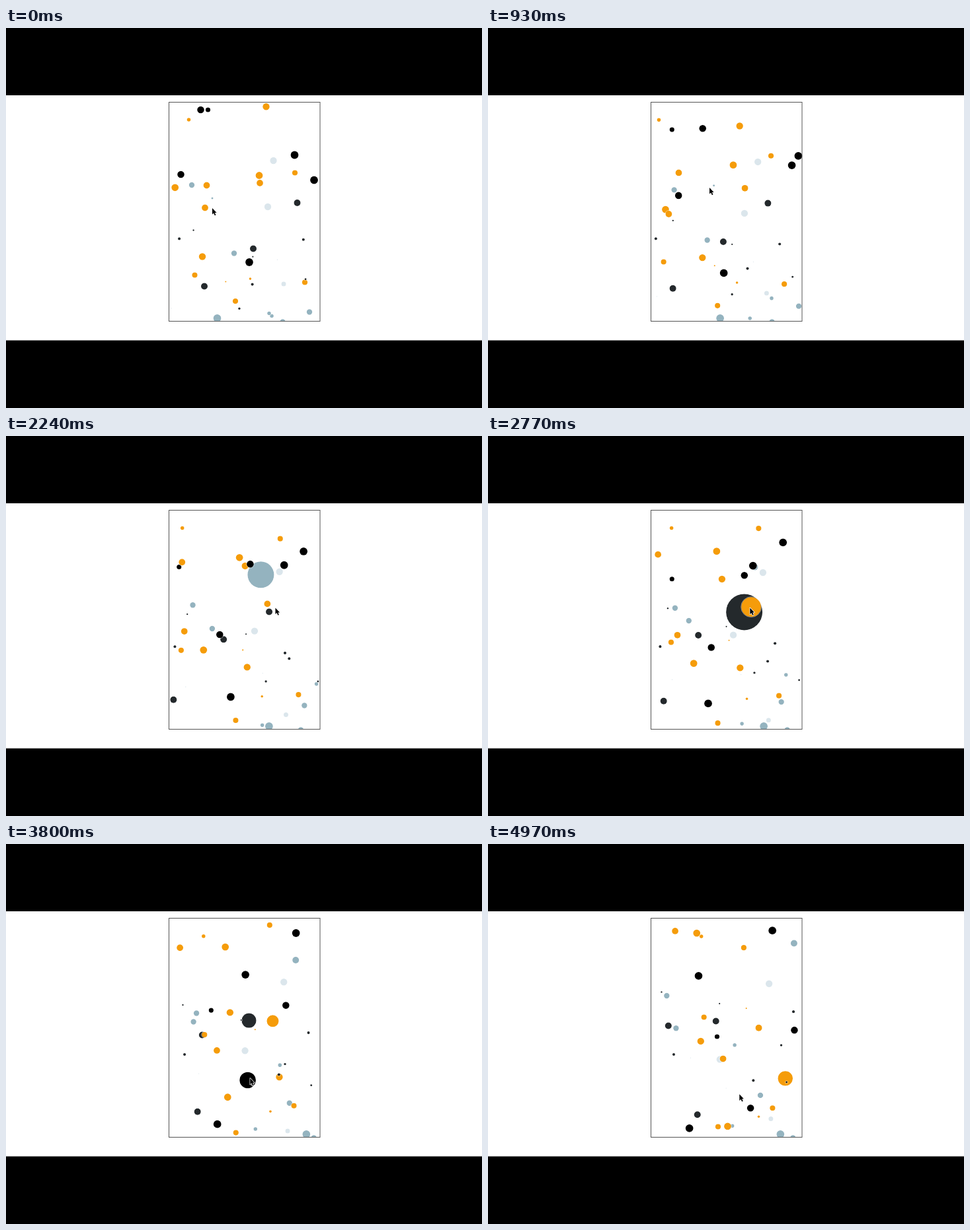
Animation, 720 px wide and 576 px high, one loop 5000 ms. Source, as an HTML page with a canvas:

```html
<!DOCTYPE html>
<html lang="en">
<head>
<meta charset="utf-8">
<title>Bouncing dots</title>
<style>
  html, body { margin: 0; width: 100%; height: 100%; overflow: hidden; background: #000; }
  canvas { display: block; }
</style>
</head>
<body>
<canvas id="stage" width="720" height="576"></canvas>
<script>
const ctx = document.getElementById('stage').getContext('2d');
const LOOP = 5000, FPS = 30, FRAMES = 150, SUBSTEPS = 4;
const SLOW_FRAMES = 28, SLOW = 0.941;   // the opening second runs slightly slower
const BOX = { left: 246.5, right: 475, top: 112.5, bottom: 444.5 };
const GROWTH = 60, MAX_R = 33, REST_R = 5, REACH = 4.5;
const PALE = '#dbe6ec', ORANGE = '#f59c0a', DARK = '#24292c', BLUE = '#94b3bf', BLACK = '#000';

// Pointer tip: time, x, y
const pointer = [
  [0, 312, 272], [0.933, 335, 241], [1.3, 347, 222], [1.45, 362, 223], [1.567, 365, 223.5],
  [1.93, 390, 236], [2.233, 407.5, 259.5], [2.5, 394, 267], [2.7, 397, 258], [3.3, 391, 272],
  [3.7, 363, 352], [4.1, 388, 360], [4.21, 407, 358], [4.3, 434.5, 343], [4.35, 433, 353],
  [4.94, 404, 368], [4.967, 380, 378.5]
];
const arrow = [[0, 1], [0, 10.6], [2.2, 8.6], [3.8, 12.2], [5.4, 11.5], [3.9, 8], [6.6, 8]];

const dots = [];
const add = (color, r, ...starts) => starts.forEach(([x, y, vx, vy]) =>
  dots.push({ color, r, x, y, vx, vy, rest: Math.max(r, REST_R), hover: true, path: [] }));

// Start point and velocity in px per second, back to front.
add(PALE, 5.2, [404.5, 201, 4.2, 2.2], [396, 271, -9.2, 11.3]);
add(PALE, 3.5, [420, 388, 1.6, 15.8]);
add(ORANGE, 5.2, [393.5, 119.2, -14.6, -37.3], [297, 346.5, 31.1, 1.8]);
add(DARK, 5, [440.5, 265, -19.5, 0.7], [374, 334.5, -20.6, -12], [300, 391.5, -23.2, 3.8]);
add(BLUE, 1.5, [312, 258, 33.7, -21.9]);
add(BLUE, 4.2, [281, 238, 0.7, 8.4], [345, 341.5, -15.2, -22.7], [418.5, 445.5, 12.6, 0],
  [459, 430.5, 14.4, -10.1]);
add(BLUE, 5.9, [319.5, 440, 36, 0]);
add(BLUE, 2.8, [402, 436.5, -6.6, 4], [398, 432.5, 35.3, -26]);
add(BLACK, 5.3, [294.5, 124, 34.4, 32.2], [264.5, 222, 27, 36.3]);
add(BLACK, 3.6, [305.5, 124, -31, 34.2]);
add(BLACK, 5.9, [436.5, 192.5, 37.4, 1.5], [466, 230.5, -7.3, -25.5], [368, 355, -12.9, 18.6]);
add(ORANGE, 2.8, [276.5, 139, -20.5, 0.2]);
add(ORANGE, 4.1, [437, 219.5, -10.2, -29.3], [285.5, 374.5, -22.6, -22.8],
  [452, 385.5, -4.4, 3], [347, 414, 0.2, 7.8]);
add(ORANGE, 5.4, [383, 223.5, -13.7, -18], [255.7, 241.8, -23.3, 37.9]);
add(ORANGE, 4.9, [303.5, 238.5, -17.1, -21.7], [301, 272.5, -31.4, 10.8], [384, 235, 5.2, 8.9]);

// Scattered specks, too small to catch the pointer.
let seed = 7;
const random = (lo, hi) => {
  seed = (seed * 16807) % 2147483647;
  return lo + (hi - lo) * seed / 2147483647;
};
for (let i = 0; i < 11; i++) {
  dots.push({
    color: i < 2 ? PALE : i < 4 ? ORANGE : DARK,
    r: i < 2 ? 0.7 : random(0.7, 2.2),
    x: random(250, 470), y: random(250, 440),
    vx: random(-30, 30), vy: random(-30, 15),
    hover: false, path: []
  });
}

function pointerAt(t) {
  const i = pointer.findIndex(k => k[0] > t);
  if (i < 0) return pointer[pointer.length - 1].slice(1);
  const [t0, x0, y0] = pointer[i - 1], [t1, x1, y1] = pointer[i];
  const p = (t - t0) / (t1 - t0);
  return [x0 + (x1 - x0) * p, y0 + (y1 - y0) * p];
}

function bounce(p, v, r, lo, hi) {
  return (p - r < lo && v < 0) || (p + r > hi && v > 0) ? -v : v;
}

// A dot swells while the pointer is inside it and shrinks again afterwards.
function resize(d, [px, py], dt) {
  const inside = Math.hypot(px - d.x, py - d.y) < Math.max(d.r, REACH);
  if (inside) d.r = Math.min(MAX_R, d.r + GROWTH * dt);
  else if (d.r > d.rest) d.r = Math.max(d.rest, d.r - GROWTH * dt);
}

// Run the whole loop once, so any frame can be looked up by time.
for (let n = 0; n < FRAMES; n++) {
  dots.forEach(d => d.path.push([d.x, d.y, d.r]));
  const step = 1 / FPS / SUBSTEPS;
  const dt = step * (n < SLOW_FRAMES ? SLOW : 1);
  for (let i = 1; i <= SUBSTEPS; i++) {
    const tip = pointerAt(n / FPS + i * step);
    for (const d of dots) {
      d.x += d.vx * dt;
      d.y += d.vy * dt;
      if (d.hover) resize(d, tip, step);
      d.vx = bounce(d.x, d.vx, d.r, BOX.left, BOX.right);
      d.vy = bounce(d.y, d.vy, d.r, BOX.top, BOX.bottom);
    }
  }
}

function drawDot(color, [x, y, r]) {
  ctx.beginPath();
  ctx.arc(x, y, r, 0, Math.PI * 2);
  ctx.fillStyle = color;
  ctx.fill();
  ctx.beginPath();
  ctx.arc(x, y, r + 0.6, 0, Math.PI * 2);
  ctx.strokeStyle = 'rgba(255,255,255,.6)';
  ctx.lineWidth = 0.7;
  ctx.stroke();
}

function drawPointer([x, y]) {
  ctx.save();
  ctx.translate(x, y);
  ctx.beginPath();
  arrow.forEach(([px, py]) => ctx.lineTo(px, py));
  ctx.closePath();
  ctx.lineJoin = 'round';
  ctx.lineWidth = 1.4;
  ctx.strokeStyle = '#fff';
  ctx.stroke();
  ctx.fillStyle = '#000';
  ctx.fill();
  ctx.restore();
}

function draw(frame) {
  ctx.fillStyle = '#000';
  ctx.fillRect(0, 0, 720, 576);
  ctx.fillStyle = '#fff';
  ctx.fillRect(0, 102, 720, 371.5);

  ctx.save();
  ctx.beginPath();
  ctx.rect(246, 112, 230, 333);
  ctx.clip();
  dots.forEach(d => drawDot(d.color, d.path[frame]));
  ctx.restore();

  ctx.strokeStyle = '#555';
  ctx.lineWidth = 1;
  ctx.strokeRect(246.5, 112.5, 228.5, 332);
  drawPointer(pointerAt(frame / FPS));
}

const start = performance.now();
function tick() {
  const ms = (performance.now() - start) % LOOP;
  draw(Math.min(FRAMES - 1, Math.floor((ms + 4) * FPS / 1000)));
  requestAnimationFrame(tick);
}
tick();
</script>
</body>
</html>
```
